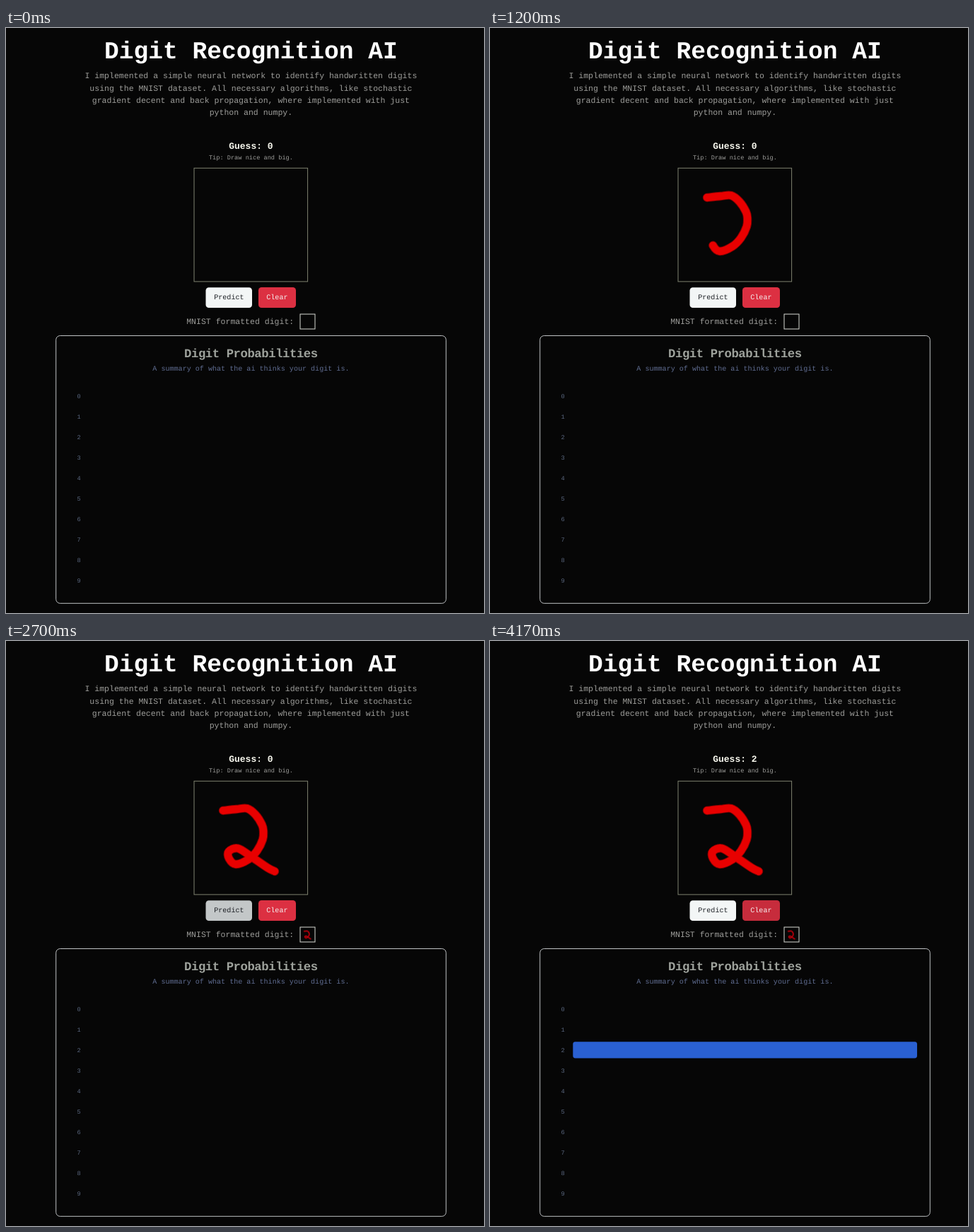
Animation of 676x828 px, one loop 4.21 s. Source, as an HTML page:

```html
<!DOCTYPE html>
<html lang="en">
<head>
<meta charset="utf-8">
<title>Digit Recognition AI</title>
<style>
  html, body { margin: 0; width: 100%; height: 100%; overflow: hidden; background: #060606; }
  svg { display: block; width: 676px; height: 828px; }
  text {
    font-family: "Liberation Mono", "Courier New", monospace; font-size: 11.52px;
    fill: #9d9d9a; text-rendering: geometricPrecision;
  }
  .mid { text-anchor: middle; }
  .bold { font-weight: 700; }
  .title { font-size: 34.56px; fill: #fff; }
  .guess { font-size: 12.96px; fill: #fafaf0; }
  .tip, .axis { font-size: 8.64px; }
  .button, .sub { font-size: 10.08px; }
  .heading { font-size: 17.28px; letter-spacing: -.025em; fill: #9ea29c; }
  .sub { fill: #5f6c90; }
  .axis { fill: #5b6880; text-anchor: end; }
  .frame { fill: none; }
  .ink { fill: none; stroke-linecap: round; stroke-linejoin: round; }
</style>
</head>
<body>
<svg viewBox="0 0 676 828">
  <text class="mid bold title" x="346.4" y="43.4">Digit Recognition AI</text>
  <g id="intro"></g>

  <text class="bold guess" x="315.3" y="171">Guess:</text>
  <text class="bold guess" x="369.7" y="171" id="before">0</text>
  <text class="bold guess" x="369.7" y="171" id="after">2</text>
  <text class="mid tip" x="346.4" y="186">Tip: Draw nice and big.</text>

  <rect class="frame" x="266" y="198.3" width="160.6" height="160.6" stroke="#7f8270"/>
  <g id="drawing">
    <path class="ink" stroke="#860000" stroke-width="12.4"/>
    <path class="ink" stroke="#e80000" stroke-width="10.4"/>
  </g>

  <rect id="predict" x="282.5" y="367.2" width="65.5" height="28.8" rx="4.3" fill="#f3f6f6"/>
  <text class="mid button" x="315.4" y="384.3" style="fill:#1c1f24">Predict</text>
  <rect id="clear" x="357" y="367" width="53" height="29" rx="4.3" fill="#dc3042"/>
  <text class="mid button" x="383.4" y="384.3" style="fill:#f4eeee">Clear</text>

  <text x="255.2" y="418.5">MNIST formatted digit:</text>
  <rect class="frame" x="416" y="405" width="21" height="21" stroke="#d8dad4"/>
  <g id="mini" transform="translate(416.6 405.6) scale(.125) translate(-266 -198)">
    <path class="ink" stroke="#bc000c" stroke-width="14"/>
  </g>

  <rect class="frame" x="70.7" y="435.5" width="551.6" height="378.8" rx="5.8" stroke="#bfc2c4"/>
  <text class="mid bold heading" x="346.4" y="466.2">Digit Probabilities</text>
  <text class="mid sub" x="346.4" y="484.7">A summary of what the ai thinks your digit is.</text>
  <g id="axis"></g>
  <rect id="bar" x="117.3" y="567.2" width="0" height="23.2" rx="3.4" fill="#2a60d2"/>
</svg>
<script>
const LOOP = 4210;
const NS = "http://www.w3.org/2000/svg";
const $ = id => document.getElementById(id);

function addText(parent, cls, x, y, content) {
  const el = document.createElementNS(NS, "text");
  el.setAttribute("class", cls);
  el.setAttribute("x", x);
  el.setAttribute("y", y);
  el.textContent = content;
  parent.append(el);
}

// Steps are [time in ms, value, optional easing to the next step].
function play(el, prop, steps) {
  const last = steps[steps.length - 1][1];
  const frames = [[0, steps[0][1]], ...steps, [LOOP, last]].map(([ms, value, easing = "linear"]) =>
    ({ offset: ms / LOOP, [prop]: value, easing }));
  el.animate(frames, { duration: LOOP, iterations: Infinity });
}

const swap = (el, ms, from, to) => play(el, "opacity", [[ms, from], [ms, to]]);

[
  "I implemented a simple neural network to identify handwritten digits",
  "using the MNIST dataset. All necessary algorithms, like stochastic",
  "gradient decent and back propagation, where implemented with just",
  "python and numpy."
].forEach((line, i) => addText($("intro"), "mid", 346.4, 71.3 + i * 17.28, line));

for (let d = 0; d < 10; d++) addText($("axis"), "axis", 105.8, 524 + d * 29, d);

// A smooth curve through key points, as one path command per segment.
function curve(points) {
  const at = i => points[Math.max(0, Math.min(points.length - 1, i))];
  const handle = (i, sign) => at(i).map((v, k) => v + sign * (at(i + 1)[k] - at(i - 1)[k]) / 6);
  return points.map((p, i) => i ? `C${handle(i - 1, 1)} ${handle(i, -1)} ${p}` : `M${p}`);
}

const segments = curve([
  [307, 240], [326, 238], [341, 237], [353, 246], [362, 260], [364, 269],
  [363, 281], [355, 297], [343, 309], [325, 316], [315.5, 308],
  [315, 298], [328, 293.5], [348, 306], [370, 321], [380, 326]
]);

function lengthTo(index) {
  const path = document.createElementNS(NS, "path");
  path.setAttribute("d", segments.slice(0, index + 1).join(""));
  return path.getTotalLength();
}

document.querySelectorAll(".ink").forEach(el => el.setAttribute("d", segments.join("")));

// When the pen reaches the start, the bend, the foot and the tail: [ms, key point].
const PEN = [[80, 0], [600, 5], [1200, 10], [1760, 15]];
const total = lengthTo(15);
for (const el of $("drawing").children) {
  el.style.strokeDasharray = `${total} ${total + 50}`;
  play(el, "strokeDashoffset", PEN.map(([ms, i]) => [ms, `${total - (i && lengthTo(i))}px`]));
}
swap($("drawing"), PEN[0][0], 0, 1);

const HOVER = 150, EASE = "cubic-bezier(.4,0,.2,1)";
const fade = (ms, from, to) => [[ms, from, EASE], [ms + HOVER, to]];
play($("predict"), "fill", [
  ...fade(2230, "#f3f6f6", "#c3c7c8"), ...fade(3580, "#c3c7c8", "#f3f6f6")
]);
play($("clear"), "fill", fade(3700, "#dc3042", "#c72c3c"));

const RESULT = 2836;
swap($("mini"), 2600, 0, 1);
swap($("before"), RESULT, 1, 0);
swap($("after"), RESULT, 0, 1);
play($("bar"), "width", [[RESULT, "0px", "ease"], [RESULT + 400, "486.7px"]]);
</script>
</body>
</html>
```
